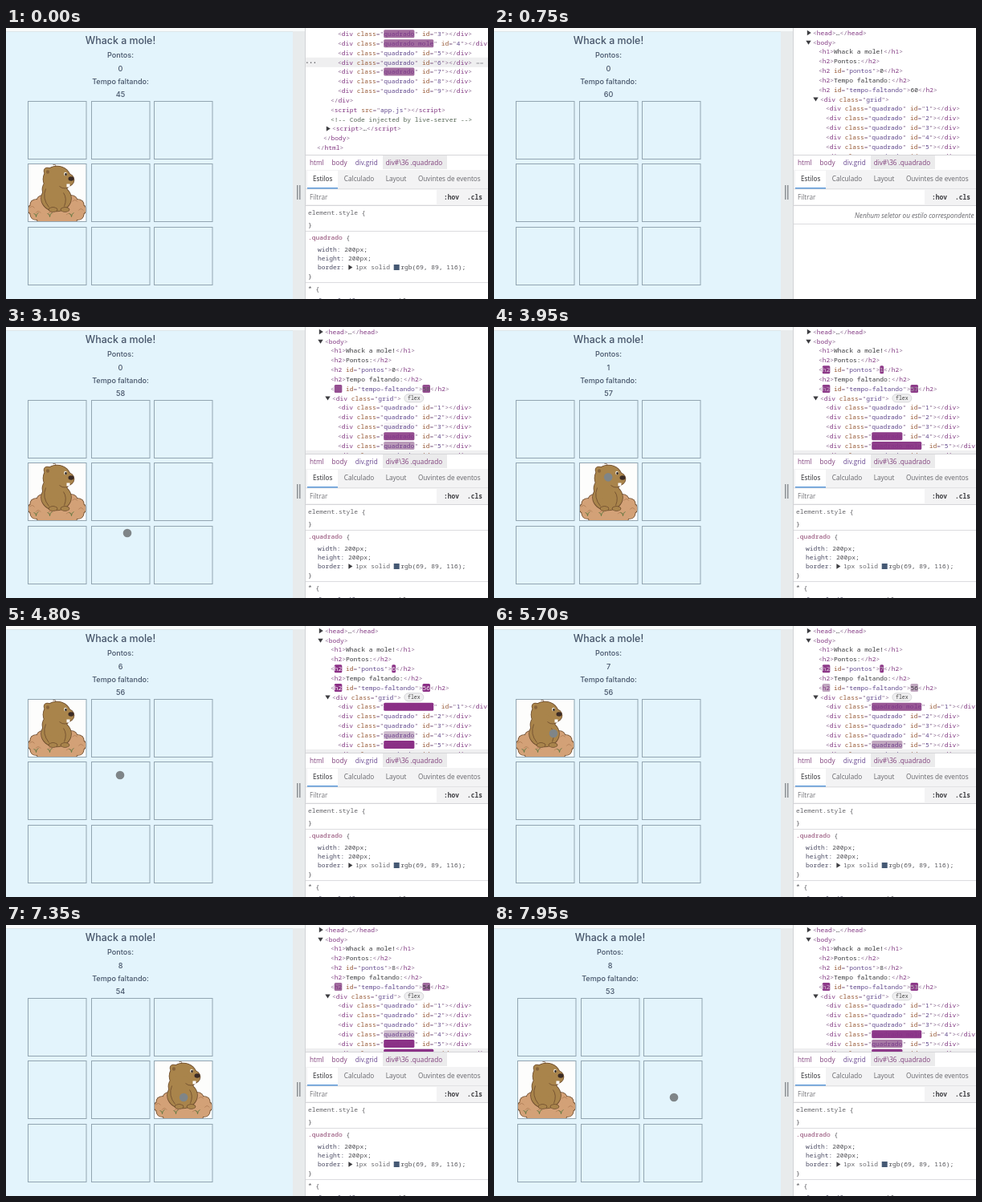
An HTML page with a canvas for the animation above (8 s loop, 600 by 338 pixels).

```html
<!DOCTYPE html>
<html lang="pt">
<head>
<meta charset="utf-8">
<title>Whack a mole</title>
<style>
html, body { margin: 0; width: 100%; height: 100%; overflow: hidden; background: #fff; }
canvas { display: block; width: 600px; height: 338px; }
</style>
</head>
<body>
<canvas id="stage" width="600" height="338"></canvas>
<script>
const ctx = document.getElementById('stage').getContext('2d');

const LOOP = 8000, RELOAD = 650, STYLES = 950, HEAD = 1100, SHIFT = 7720;
const FIRST = 1750, STEP = 505;           // the mole moves every STEP ms
const MOLES = [3, 5, 7, 4, 4, 5, 5, 1, 1, 4, 9, 5, 6, 4];   // starts at step -1
const MAX_SCORE = 8, FADE = 1400, GLIDE = 600;

// cursor stops: arrival time, x, y
const STOPS = [[1250, 57, 205], [1850, 147, 159], [3100, 151, 257], [4000, 142, 186],
               [5550, 74, 134], [6400, 73, 216], [7400, 224, 215]];

const MONO = '"Noto Sans Mono", "DejaVu Sans Mono", monospace';
const UI = '"Open Sans", "Noto Sans", sans-serif';
const PAGE = 'Inter, sans-serif';
const CODE = 7.95, CHAR = CODE * 0.6, LINE = 11.83, SMALL = 8.2;

const PURPLE = [139, 47, 134], MAUVE = [150, 130, 150], WHITE = [255, 255, 255];
const INK = { tag: [130, 56, 130], punct: [140, 108, 145], attr: [153, 92, 58],
              value: [98, 74, 142], text: [58, 58, 62], note: [88, 105, 88] };
const BORDER = '#d6d6d9', GREY = '#66666b', DARK = '#505055', FUR = '#a9844b', OUTLINE = '#6b4a2c';

const clamp = v => Math.max(0, Math.min(1, v));
const ease = k => k * k * (3 - 2 * k);
const mix = (a, b, k) => a.map((v, i) => v + (b[i] - v) * k);
const rgb = (c, a = 1) => `rgba(${c.map(Math.round).join(',')},${a})`;

function rect(x, y, w, h, fill) {
  ctx.fillStyle = fill;
  ctx.fillRect(x, y, w, h);
}

function oval(x, y, rx, ry, fill) {
  ctx.beginPath();
  ctx.ellipse(x, y, rx, ry, 0, 0, 7);
  ctx.fillStyle = fill;
  ctx.fill();
}

function curve(x0, y0, cx, cy, x1, y1, color) {
  ctx.strokeStyle = color;
  ctx.beginPath();
  ctx.moveTo(x0, y0);
  ctx.quadraticCurveTo(cx, cy, x1, y1);
  ctx.stroke();
}

function label(str, x, y, size, color, family = UI, style = '', align = 'left') {
  ctx.font = `${style} ${size}px ${family}`;
  ctx.textAlign = align;
  ctx.fillStyle = color;
  ctx.fillText(str, x, y + size * 0.35);
  return ctx.measureText(str).width;
}

function code(str, x, y, color, style = '') {
  return x + label(str, x, y, CODE, color, MONO, style);
}

function triangle(x, y, down) {
  ctx.save();
  ctx.translate(x, y);
  if (down) ctx.rotate(Math.PI / 2);
  ctx.fillStyle = '#3c3c40';
  ctx.beginPath();
  ctx.moveTo(-2.2, -3.2);
  ctx.lineTo(2.8, 0);
  ctx.lineTo(-2.2, 3.2);
  ctx.fill();
  ctx.restore();
}

// Each run is [kind, text, age of its last change]
function runs(list, x, y) {
  for (const [kind, str, age = FADE] of list) {
    const k = clamp(age / FADE), w = str.length * CHAR;
    let ink = INK[kind];
    if (k < 1) {
      ctx.fillStyle = rgb(mix(PURPLE, MAUVE, k), 1 - k * k);
      ctx.beginPath();
      ctx.roundRect(x, y - 5, w, 10, 1.5);
      ctx.fill();
      ink = kind === 'value' ? mix(PURPLE, ink, k) : mix(WHITE, ink, clamp(age / 400));
    }
    code(str, x, y, rgb(ink));
    x += w;
  }
  return x;
}

const end = ['punct', '>'];
const open = (name, age) => [['punct', '<'], ['tag', name, age]];
const close = name => [['punct', '</'], ['tag', name], end];
const attr = (name, value, age) =>
  [['attr', ' ' + name], ['punct', '="'], ['value', value, age], ['punct', '"']];

const element = (name, attrs, body, age, bodyAge) =>
  [...open(name, age), ...attrs, end, ['text', body, bodyAge], ...close(name)];

const square = (id, mole, age) =>
  element('div', [...attr('class', mole ? 'quadrado mole' : 'quadrado', age), ...attr('id', String(id))], '');

const moleAt = n => MOLES[n + 1];

// a burst of six clicks, a pause, then the rest
const hitTime = i => 3840 + 185 * i + (i > 5 ? 640 : 0);

function gameAt(t) {
  if (t < RELOAD) return { old: true, mole: 4, time: 45, score: 0 };
  const n = Math.floor((t - FIRST) / STEP), tick = Math.floor(n / 2);
  const since = m => t - FIRST - m * STEP;
  const squareAge = id => {
    for (let m = n; m >= -1; m--)
      if (moleAt(m) === id || moleAt(m - 1) === id) return since(m);
    return FADE;
  };
  let score = 0;
  while (score < MAX_SCORE && hitTime(score) <= t) score++;
  return {
    n, squareAge, score,
    mole: moleAt(n),
    time: n >= 0 ? 59 - tick : 60,
    timeAge: n >= 0 ? since(tick * 2) : FADE,
    scoreAge: score ? t - hitTime(score - 1) : FADE
  };
}

// Overlapping ovals that share one outline
function cluster(ovals, fill) {
  for (const [x, y, rx, ry] of ovals) oval(x, y, rx + 0.8, ry + 0.8, OUTLINE);
  for (const [x, y, rx, ry] of ovals) oval(x, y, rx, ry, fill);
}

function drawMole(x, y) {
  ctx.save();
  ctx.translate(x, y);
  rect(0, 0, 72, 72, '#fdfdfc');
  ctx.beginPath();
  ctx.rect(0, 0, 72, 72);
  ctx.clip();
  ctx.lineWidth = 0.8;

  const lumps = [[36, 58, 31, 15]];
  for (let a = 0; a < 6.2; a += Math.PI / 7)
    lumps.push([36 + 29 * Math.cos(a), 57 - 14 * Math.sin(a), 7, 6.5]);
  cluster(lumps, '#d3a177');
  for (let i = 0; i < 9; i++) {
    const px = 5 + i * 7.6, py = 55 + 9 * Math.sin(i * 2.4);
    curve(px - 3, py, px, py - 4, px + 3, py, '#ad7a54');
  }

  cluster([[24, 9, 4, 4], [36, 19, 17, 16], [48, 20, 9, 8], [35, 43, 18.5, 16], [33, 32, 15, 14]], FUR);
  oval(24.5, 10, 2, 2.2, '#87633a');
  curve(22, 31, 17, 43, 26, 54, OUTLINE);
  curve(44, 36, 49, 43, 45, 53, OUTLINE);
  curve(39, 28, 46, 34, 54, 26, OUTLINE);
  curve(34, 3, 35, 0, 31, 1, OUTLINE);
  cluster([[31, 57, 5, 2.5], [46, 57, 5, 2.5]], FUR);
  oval(46.5, 12.5, 1.8, 2.2, '#f4eee4');
  oval(47, 13, 1.2, 1.7, '#2a211c');
  oval(53.5, 18.5, 3.5, 2.7, '#3a2b25');
  rect(48, 25, 4, 4, '#fff');

  for (const px of [10, 27, 54]) {
    curve(px - 3, 62, px, 62, px, 66, '#52733a');
    curve(px + 3, 61, px, 62, px, 66, '#52733a');
  }
  ctx.restore();
}

function drawPage(t, game) {
  rect(0, 0, 372, 338, '#e3f4fc');
  rect(0, 0, 372, 4, '#f8fafa');
  rect(0, 4, 357, 1, '#dce6ea');
  rect(357, 4, 15, 334, '#e8ebec');
  for (const x of [362, 365]) rect(x, 196, 1.5, 18, '#8d9296');

  const dx = t >= SHIFT ? 2 : 0;
  label('Whack a mole!', 142.5 + dx, 15.5, 12.4, '#465469', PAGE, '500', 'center');
  ['Pontos:', game.score, 'Tempo faltando:', game.time].forEach((str, i) =>
    label(String(str), 142.5 + dx, 34 + i * 16.4, 9.1, '#465469', PAGE, '500', 'center'));

  for (let i = 0; i < 9; i++) {
    const x = 27.5 + dx + Math.round((i % 3) * 78.6);
    const y = 91.5 + Math.round(Math.floor(i / 3) * 78.4);
    if (game.mole === i + 1) drawMole(x, y);
    ctx.strokeStyle = '#92a5b1';
    ctx.lineWidth = 1;
    ctx.strokeRect(x, y, 72.5, 72);
  }
}

function selectedRow(y) {
  rect(373, y - 6, 227, 12, '#efeff0');
  code('···', 372.5, y, DARK, 'bold');
  code('== $0', 585, y, '#a0a0a5');
}

function oldTree(t) {
  const row = i => 7.3 + i * LINE;
  selectedRow(row(3));
  for (let id = 3; id <= 9; id++)
    runs(square(id, id === 4, [3, 4, 7].includes(id) ? 560 + t : FADE), 413, row(id - 3));
  runs(close('div'), 404, row(7));
  runs(element('script', attr('src', 'app.js'), ''), 404, row(8));
  runs([['note', '<!-- Code injected by live-server -->']], 404, row(9));
  triangle(401, row(10));
  runs(element('script', [], '…'), 406, row(10));
  runs(close('body'), 395, row(11));
  runs(close('html'), 387, row(12));
}

function newTree(t, game) {
  const row = i => 6 + i * LINE;
  if (t >= STYLES) selectedRow(row(13));
  triangle(392, row(0));
  runs(element('head', [], '…', t >= HEAD ? t - HEAD : FADE), 397, row(0));
  triangle(391.5, row(1), true);
  runs([...open('body'), end], 397, row(1));
  const counter = (id, value, age) => element('h2', attr('id', id), String(value), age, age);
  [
    element('h1', [], 'Whack a mole!'),
    element('h2', [], 'Pontos:'),
    counter('pontos', game.score, game.scoreAge),
    element('h2', [], 'Tempo faltando:'),
    counter('tempo-faltando', game.time, game.timeAge)
  ].forEach((line, i) => runs(line, 404, row(i + 2)));
  triangle(400.5, row(7), true);
  const x = runs([...open('div'), ...attr('class', 'grid'), end], 406, row(7));
  if (t >= STYLES) {
    ctx.beginPath();
    ctx.roundRect(x + 4, row(7) - 5, 24, 10, 5);
    ctx.fillStyle = '#efeff0';
    ctx.fill();
    ctx.strokeStyle = '#c9c9cd';
    ctx.lineWidth = 0.7;
    ctx.stroke();
    label('flex', x + 16, row(7), 6.5, '#444', MONO, '', 'center');
  }
  // the panel skips one refresh at step 2
  for (let id = 1; id <= 6; id++)
    runs(square(id, game.mole === id && game.n !== 2, game.squareAge(id)), 413, row(id + 7));
}

// Labels in a row, each placed after the one before
function series(names, x, y, gap, color) {
  names.forEach((name, i) => { x += label(name, x, y, SMALL, color(i)) + gap; });
}

function drawBars() {
  rect(373, 158, 227, 180, '#fff');
  rect(373, 158, 227, 1, BORDER);
  rect(469, 159, 80, 17, '#ebebec');
  series(['html', 'body', 'div.grid', 'div#\\36 .quadrado'], 378, 168, 10,
    i => i === 2 ? '#6a4a92' : '#80407c');

  rect(373, 177, 227, 44, '#f3f3f4');
  rect(375, 178, 38, 22, '#fff');
  rect(373, 200, 227, 1, '#e2e2e4');
  rect(375, 199, 38, 1.5, '#5b98d8');
  series(['Estilos', 'Calculado', 'Layout', 'Ouvintes de eventos'], 382, 188, 14.5,
    i => i ? GREY : '#2c2c30');

  rect(374, 202, 162, 18, '#fff');
  label('Filtrar', 378, 211.5, SMALL, '#77777c');
  code(':hov', 545, 211.5, '#3c3c40', 'bold');
  code('.cls', 574, 211.5, '#3c3c40', 'bold');
  rect(373, 221, 227, 1, BORDER);
}

function property(name, value, y) {
  let x = code(name + ': ', 388, y, '#4a4a62');
  if (name === 'border') {
    triangle(x + 2.5, y);
    x = code('1px solid ', x + 9, y, GREY);
    rect(x, y - 3.5, 7, 7, '#455974');
    x += 8.5;
  }
  code(value, x, y, DARK);
}

function drawStyles() {
  const rules = [
    ['element.style', GREY, []],
    ['.quadrado', '#8a406c', [['width', '200px;'], ['height', '200px;'], ['border', 'rgb(69, 89, 116);']]],
    ['*', DARK, [['font-family', 'sans-serif;']]]
  ];
  let y = 230.5;
  for (const [selector, color, props] of rules) {
    code('{', code(selector + ' ', 376, y, color), y, DARK);
    y += 15;
    for (const [name, value] of props) {
      property(name, value, y);
      y += 11;
    }
    code('}', 376, y, DARK);
    rect(373, Math.round(y + 7.5), 227, 1, '#dcdcdf');
    y += 16;
  }
}

function drawTools(t, game) {
  rect(372, 0, 228, 338, '#fff');
  rect(372, 0, 1, 338, '#d2d4d6');
  ctx.save();
  ctx.beginPath();
  ctx.rect(373, 0, 227, 158);
  ctx.clip();
  if (game.old) oldTree(t);
  else newTree(t, game);
  ctx.restore();
  drawBars();
  if (t >= RELOAD && t < STYLES) {
    label('Nenhum seletor ou estilo correspondente', 597.5, 234, SMALL, GREY, UI, 'italic', 'right');
    rect(373, 244, 227, 1, '#dcdcdf');
  } else drawStyles();
}

function drawCursor(t) {
  if (t < STOPS[0][0]) return;
  let pos = STOPS[0];
  for (const stop of STOPS.slice(1))
    pos = mix(pos, stop, ease(clamp(1 + (t - stop[0]) / GLIDE)));
  oval(pos[1], pos[2], 5.3, 5.3, '#7f8588');
}

function draw(now) {
  const t = (now - start) % LOOP;
  const game = gameAt(t);
  drawPage(t, game);
  drawTools(t, game);
  drawCursor(t);
}

const start = performance.now();
function loop() {
  draw(performance.now());
  requestAnimationFrame(loop);
}
loop();
</script>
</body>
</html>
```
